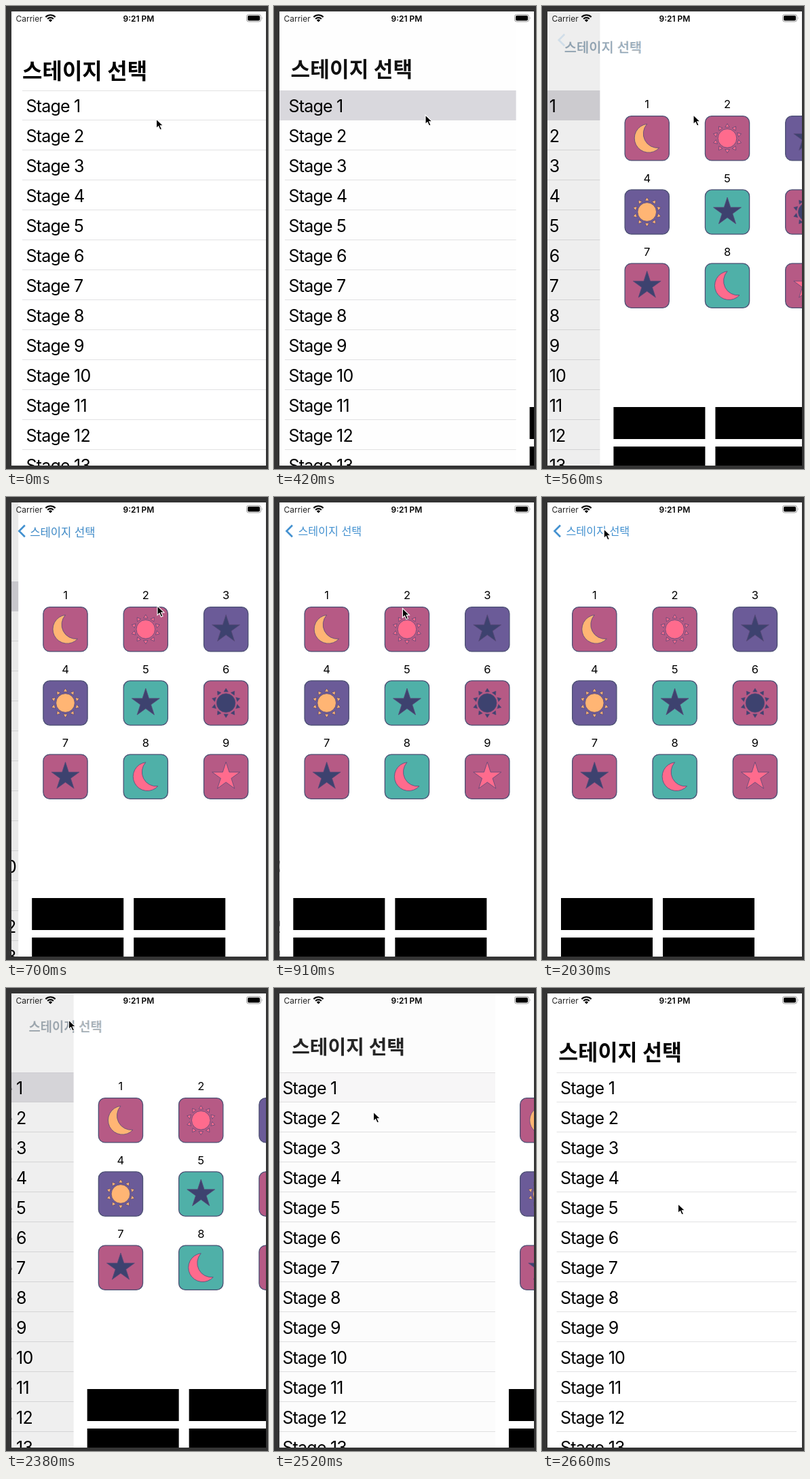
These frames come from a looping animation (386x680 px, 2.73 s). An HTML page:

```html
<!DOCTYPE html>
<html lang="ko">
<meta charset="utf-8">
<title>스테이지 선택</title>
<style>
  html, body { margin: 0; height: 100%; overflow: hidden; background: #343434; }
  svg { display: block; font-family: Inter, "Noto Sans CJK KR", "Noto Sans CJK", sans-serif; }
  .row { font-size: 25px; letter-spacing: -.8px; }
  .number { font-size: 16.5px; text-anchor: middle; }
  .status { font-size: 12px; }
  .line { fill: #e2e2e3; }
</style>
<svg width="386" height="680" viewBox="0 0 386 680">
  <clipPath id="screen"><rect x="8" y="8" width="375" height="667"/></clipPath>
  <g clip-path="url(#screen)">
    <rect x="8" y="8" width="375" height="667" fill="#fff"/>
    <g id="list"></g>
    <rect id="dim" x="8" y="8" width="375" height="667"/>
    <g id="detail"></g>
    <g id="back" fill="#4391d0">
      <path id="chevron" d="M27 41.5L18.5 50L27 58.5" fill="none" stroke="#4391d0" stroke-width="2.6"/>
    </g>
    <text id="small" fill="#4391d0" font-size="32">스테이지 선택</text>
    <text id="large" font-size="32" font-weight="700">스테이지 선택</text>
    <text class="status" x="14.5" y="22.5" fill="#222">Carrier</text>
    <text class="status" x="195.5" y="22.5" font-weight="600" text-anchor="middle">9:21 PM</text>
    <g fill="none" stroke="#000" stroke-width="2.2">
      <path d="M58.4 16.2a10 10 0 0 1 14.2 0M61.2 19a6 6 0 0 1 8.6 0"/>
      <path d="M65.5 23.5l-2.6-2.6a3.7 3.7 0 0 1 5.2 0z" fill="#000" stroke="none"/>
      <rect x="354.5" y="12.5" width="21" height="10.5" rx="3" stroke="#999" stroke-width="1"/>
    </g>
    <rect x="356" y="14" width="18" height="7.5" rx="1.8"/>
    <path d="M377 16q1.6 1.8 0 3.6z" fill="#999"/>
  </g>
  <path id="cursor" d="M0 0V13.6L3.1 10.7L5.5 16L8 14.9L5.7 9.7H10Z" stroke="#fff" stroke-width="1.1"/>
</svg>
<script>
const $ = id => document.getElementById(id);
const clamp = v => Math.min(1, Math.max(0, v));
const mix = (a, b, k) => a + (b - a) * k;
const LOOP = 2730, STEP = 70, WIDTH = 375;

// Stage list
let rows = '<rect class="line" x="24" y="124" width="359" height="1"/>';
for (let i = 0; i < 13; i++) {
  const y = 124 + 44 * i;
  rows += `<rect class="line" x="24" y="${y + 43}" width="359" height="1"/>`;
  if (!i) rows += '<rect id="selected" x="8" y="124" width="375" height="44" fill="#dad9de"/>';
  rows += `<text class="row" x="29.5" y="${y + 31.5}">Stage ${i + 1}</text>`;
}
$('list').innerHTML = rows;

// Symbols, centred on the tile
const polar = (r, turn) =>
  [r * Math.sin(turn * 2 * Math.PI), -r * Math.cos(turn * 2 * Math.PI)].map(v => v.toFixed(2)).join();
const points = (n, f) => Array.from({ length: n }, (_, i) => f(i));
const shapes = {
  moon: '<path d="M0 -21A21 21 0 1 0 18 14A21 21 0 0 1 0 -21Z"/>',
  star: `<path d="M${points(10, i => polar(i % 2 ? 8.2 : 21.5, i / 10)).join('L')}Z"/>`,
  sun: '<circle r="13.8"/>' + points(10, i =>
    `<path d="M${polar(21.5, i / 10)}L${polar(16.7, i / 10 + .03)}L${polar(16.7, i / 10 - .03)}Z"/>`).join('')
};
const pink = '#b65a85', purple = '#6b5b98', teal = '#4fb0a8';
const orange = '#ffb574', rose = '#ff6b8d', navy = '#3d426f';
const tiles = [
  [pink, 'moon', orange], [pink, 'sun', rose], [purple, 'star', navy],
  [purple, 'sun', orange], [teal, 'star', navy], [pink, 'sun', navy],
  [pink, 'star', navy], [teal, 'moon', rose], [pink, 'star', rose]
];
$('detail').innerHTML = '<rect x="8" y="8" width="375" height="667" fill="#fff"/>' +
  tiles.map(([fill, shape, color], i) => {
    const x = 77.3 + 118.3 * (i % 3), y = 194.3 + 108.2 * (i / 3 | 0);
    return `<g transform="translate(${x} ${y})">
      <text class="number" y="-44">${i + 1}</text>
      <rect x="-32.6" y="-32.6" width="65.2" height="65.2" rx="9.5" fill="${fill}" stroke="#4b4f73" stroke-width="1.3"/>
      <g fill="${color}" stroke="#5a4a78" stroke-width=".8">${shapes[shape]}</g></g>`;
  }).join('') +
  [[28, 589], [178, 589], [28, 647], [178, 647]]
    .map(([x, y]) => `<rect x="${x}" y="${y}" width="135" height="47"/>`).join('');

// Critically damped spring, 0 to 1
const spring = (ms, rate) => {
  const x = Math.max(0, ms) * rate / 1000;
  return 1 - (1 + x) * Math.exp(-x);
};

// Pointer stops: time, x, y
const stops = [
  [0, 221.5, 166], [280, 223, 160], [770, 223, 160], [1190, 93.5, 174],
  [1680, 93.5, 174], [1960, 91, 47], [2240, 92.5, 47], [2380, 92.5, 47], [2660, 200.5, 317]
];
function pointer(t) {
  const i = Math.max(1, stops.findIndex(s => s[0] >= t));
  const [t0, x0, y0] = stops[i - 1], [t1, x1, y1] = stops[i];
  const k = clamp((t - t0) / (t1 - t0)), e = k * k * (3 - 2 * k);
  return [mix(x0, x1, e), mix(y0, y1, e)];
}

const place = (el, x, y, scale = 1) =>
  el.setAttribute('transform', `translate(${x} ${y}) scale(${scale})`);

function draw(t) {
  const pop = spring(t - 2325, 17.2);
  const shown = spring(t - 396, 18) * (1 - pop);
  place($('list'), -.3 * WIDTH * shown, 0);
  place($('detail'), WIDTH * (1 - shown), 0);
  $('dim').setAttribute('opacity', .083 * shown);
  $('selected').setAttribute('opacity', t < 350 ? 0 : 1 - pop);

  // Back label and large title morph into each other
  const grow = t < 2000 ? 1 - shown ** 1.13 : pop ** 1.28;
  for (const id of ['small', 'large'])
    place($(id), mix(35.5, 24, grow), mix(56, 107, grow), mix(.505, 1, grow));
  $('large').setAttribute('opacity', shown > .99 ? 0 : 1 - shown);
  $('small').setAttribute('opacity', clamp((shown - .7) / .25));
  $('chevron').setAttribute('opacity', clamp((shown - .76) / .2));
  place($('back'), 30 * (1 - shown), 0);
  place($('cursor'), ...pointer(t));
}

function tick(now) {
  draw(Math.floor(now % LOOP / STEP) * STEP);
  requestAnimationFrame(tick);
}
draw(0);
requestAnimationFrame(tick);
</script>
</html>
```
